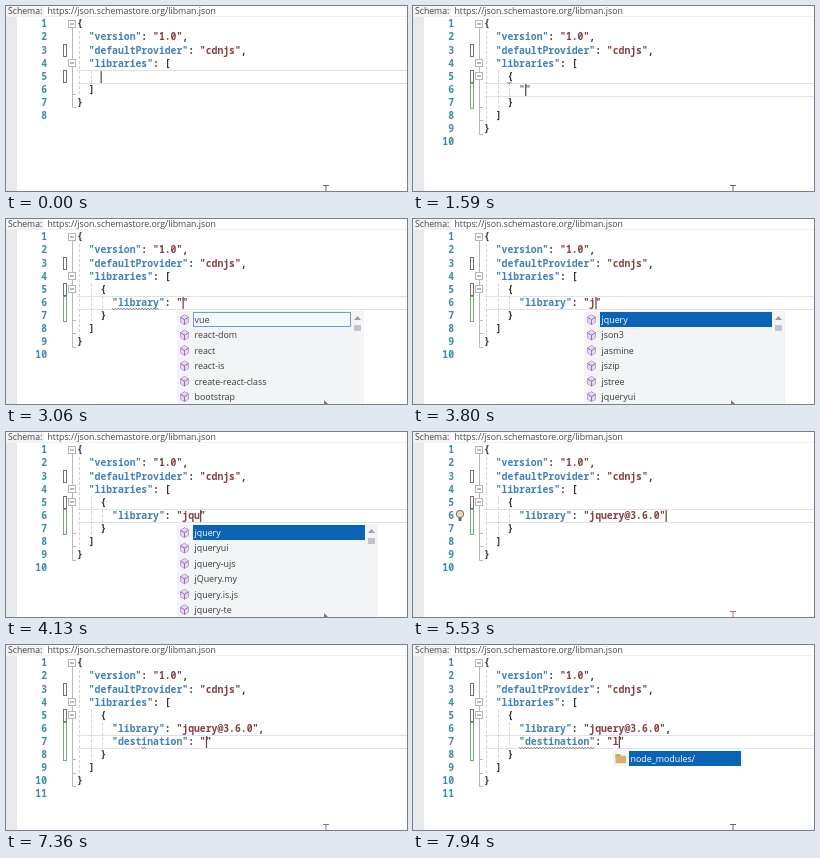
An HTML page with a canvas for the animation above (8 s loop, 401x185 px).

```html
<!DOCTYPE html>
<html lang="en">
<head>
<meta charset="utf-8">
<title>Editing libman.json</title>
<style>
html, body { margin: 0; width: 100%; height: 100%; overflow: hidden; background: #fff; }
canvas { display: block; width: 401px; height: 185px; }
</style>
</head>
<body>
<canvas id="stage"></canvas>
<script>
const W = 401, H = 185, LOOP = 8000;
const ADV = 5.85, LEFT = 71, PITCH = 13.07, ITEM = 15.4;
const MONO = '600 9.75px "Noto Sans Mono", monospace';
const UI = '"Open Sans", "Noto Sans", sans-serif';

const canvas = document.getElementById('stage');
const ratio = window.devicePixelRatio || 1;
canvas.width = W * ratio;
canvas.height = H * ratio;
const ctx = canvas.getContext('2d', { alpha: false });

const rowTop = row => 12 + PITCH * (row - 1);
const colX = col => LEFT + ADV * col;

const HEAD = ['{', '  "version": "1.0",', '  "defaultProvider": "cdnjs",', '  "libraries": ['];
const TAIL = ['  ]', '}', ''];
const LIBRARY = '"library": "jquery@3.6.0",';

const keyList = (y, ...items) => ({ x: 108, y, w: 83, items, icon: 'wrench' });
const packages = (w, filled, items) =>
  ({ x: 171, y: 93, w, items: items.split(' '), icon: 'cube', filled, scroll: true });
const folders = (filled, ...items) => ({ x: 200, y: 106, w: 130, items, icon: 'folder', filled });

const J_LIST = 'jquery json3 jasmine jszip jstree jqueryui';
const JQ_LIST = 'jquery jqueryui jquery-ujs jQuery.my jquery.is.js jquery-te';

// Each step changes part of the editor state; the rest carries over.
const STEPS = [
  [0, { body: [''], open: false, row: 5, col: 4, on: true, popup: null, waves: [], bulb: false, mouse: 'beam', red: false }],
  [260, { on: false }],
  [720, { body: ['{'], col: 5, on: true }],
  [790, { body: ['{}'] }],
  [1120, { body: [''], open: true, row: 6, col: 4 }],
  [1250, { col: 6 }],
  [1590, { body: ['""'], col: 7, waves: [[5, 4, 5]] }],
  [1640, { popup: keyList(92, 'destination', 'files', 'library', 'provider') }],
  [2110, { on: false }],
  [2310, { body: ['"l"'], col: 8, on: true }],
  [2380, { popup: keyList(92, 'library', 'files') }],
  [2450, { body: ['"li"'], col: 9, popup: keyList(92, 'library') }],
  [2520, { body: ['"lib"'], col: 10 }],
  [2590, { body: ['"library": '], col: 17, popup: null }],
  [2860, { body: ['"library": ""'], col: 18 }],
  [2930, { waves: [] }],
  [2990, { waves: [[6, 6, 14]] }],
  [3060, { popup: packages(187, false, 'vue react-dom react react-is create-react-class bootstrap'), mouse: 'arrow' }],
  [3400, { on: false }],
  [3620, { body: ['"library": "j"'], col: 19, on: true }],
  [3700, { popup: packages(201, true, J_LIST), waves: [] }],
  [3830, { body: ['"library": "jq"'], col: 20 }],
  [3920, { popup: packages(201, true, JQ_LIST) }],
  [4050, { body: ['"library": "jqu"'], col: 21 }],
  [4530, { body: ['"library": "jquery@3.6.0"'], col: 31, popup: null, mouse: 'beam', red: true }],
  [5010, { on: false, bulb: true }],
  [5530, { on: true }],
  [5670, { body: [LIBRARY], col: 32, bulb: false }],
  [5930, { body: [LIBRARY, ''], row: 7, col: 6 }],
  [6200, { body: [LIBRARY, '""'], col: 7 }],
  [6270, { popup: keyList(105, 'destination', 'files', 'provider') }],
  [6680, { body: [LIBRARY, '"d"'], col: 8 }],
  [6780, { popup: keyList(105, 'destination', 'provider') }],
  [6870, { body: [LIBRARY, '"de"'], col: 9 }],
  [7010, { body: [LIBRARY, '"des"'], col: 10 }],
  [7080, { popup: keyList(105, 'destination') }],
  [7150, { body: [LIBRARY, '"dest"'], col: 11 }],
  [7360, { body: [LIBRARY, '"destination": ""'], col: 22, popup: null, waves: [[7, 11, 12]] }],
  [7460, { popup: folders(false, 'bin/', 'node_modules/', 'obj/', 'Properties/', 'wwwroot/'), mouse: 'arrow' }],
  [7560, { waves: [[7, 6, 19]] }],
  [7850, { body: [LIBRARY, '"destination": "l"'], col: 23 }],
  [7940, { popup: folders(true, 'node_modules/'), mouse: 'beam', red: false }]
];

function stateAt(t) {
  const state = {};
  for (const [time, change] of STEPS) if (time <= t) Object.assign(state, change);
  return state;
}

function linesOf(s) {
  const pad = n => line => ' '.repeat(n) + line;
  const body = s.open ? ['    {', ...s.body.map(pad(6)), '    }'] : s.body.map(pad(4));
  return [...HEAD, ...body, ...TAIL];
}

function fill(color, x, y, w, h) {
  ctx.fillStyle = color;
  ctx.fillRect(x, y, w, h);
}

function box(color, x, y, w, h) {
  ctx.strokeStyle = color;
  ctx.strokeRect(x + 0.5, y + 0.5, w - 1, h - 1);
}

function path(color, points, close) {
  ctx.strokeStyle = color;
  ctx.beginPath();
  points.forEach(([x, y]) => ctx.lineTo(x, y));
  if (close) ctx.closePath();
  ctx.stroke();
}

function text(str, x, y, color, font) {
  ctx.font = font;
  ctx.fillStyle = color;
  ctx.fillText(str, x, y);
}

// The first string on a line is a key, the later ones are values.
function codeLine(line, row) {
  let strings = 0;
  const y = rowTop(row) + 9.4;
  for (const m of line.matchAll(/"[^"]*"|[^"\s]+/g)) {
    const color = m[0][0] !== '"' ? '#333' : strings++ ? '#84403f' : '#4180b8';
    text(m[0], colX(m.index), y, color, MONO);
  }
}

function guide(col, from, to) {
  ctx.setLineDash([3, 2]);
  const x = Math.round(colX(col)) + 2.5;
  path('#d2d2d6', [[x, rowTop(from)], [x, rowTop(to + 1)]]);
  ctx.setLineDash([]);
}

function foldBox(row) {
  const y = Math.round(rowTop(row)) + 2;
  fill('#fff', 62, y, 8, 8);
  box('#b4b4b4', 62, y, 8, 8);
  fill('#777', 64, y + 3.5, 4, 1);
}

function gutter(s, count) {
  fill('#e8e9ea', 0, 11, 11, H);
  ctx.textAlign = 'right';
  for (let n = 1; n <= count; n++) text(n, 41, rowTop(n) + 9.4, '#3a8cae', MONO);
  ctx.textAlign = 'left';

  box('#707070', 57, 38, 4, 13);
  box('#707070', 57, 64, 4, 13);
  if (s.open) box('#72ad78', 57, 77, 4, Math.round(PITCH * (s.body.length + 1)));

  const last = count - 1;
  const end = Math.round(rowTop(last)) + 11.5;
  path('#b8b8b8', [[66.5, 20], [66.5, end], [70, end]]);
  const closers = s.open ? [last - 1, last - 2] : [last - 1];
  for (const row of closers) {
    const y = Math.round(rowTop(row)) + 11.5;
    path('#b8b8b8', [[66.5, y], [70, y]]);
  }
  [1, 4].concat(s.open ? 5 : []).forEach(foldBox);
}

function header() {
  fill('#f3f3f5', 0, 0, 38, 11);
  fill('#f0f0f3', 38, 10, W - 38, 1);
  text('Schema:', 2, 8, '#444', '8.7px ' + UI);
  text('https://json.schemastore.org/libman.json', 41.5, 8, '#444', '8.75px ' + UI);
}

function wave([row, from, to]) {
  const points = [];
  const y = rowTop(row) + 12.4;
  for (let x = colX(from), i = 0; x <= colX(to); x += 1.5, i++) points.push([x, y + (i % 2 ? 1 : -0.6)]);
  path('#7b807b', points);
}

const icons = {
  cube(x, y) {
    const corner = i => [x + 4.6 * Math.sin(i * Math.PI / 3), y - 4.8 * Math.cos(i * Math.PI / 3)];
    ctx.fillStyle = '#e4d8ec';
    path('#9470b2', [0, 1, 2, 3, 4, 5].map(corner), true);
    ctx.fill();
    for (const i of [1, 3, 5]) path('#9470b2', [[x, y], corner(i)]);
  },
  wrench(x, y) {
    ctx.lineWidth = 1.6;
    path('#666', [[x - 3.5, y + 3.5], [x + 1, y - 1]]);
    ctx.beginPath();
    ctx.arc(x + 1.8, y - 1.8, 2.2, 0, Math.PI * 1.5);
    ctx.stroke();
    ctx.lineWidth = 1;
  },
  folder(x, y) {
    fill('#c49a52', x - 5, y - 4.5, 5, 3);
    fill('#d6b06c', x - 5, y - 3, 10.5, 7.5);
  }
};

function popup(p) {
  const h = p.items.length * ITEM;
  const bottom = p.scroll ? H + 2 : p.y + h;
  fill('#f3f4f5', p.x, p.y - 1, p.w, bottom - p.y + 1);
  const selW = p.w - 17 - (p.scroll ? 12 : 1);
  if (p.filled) fill('#0a63b5', p.x + 16, p.y, selW, 15);
  else {
    fill('#f6f9fc', p.x + 16, p.y, selW, 15);
    box('#6a9fd8', p.x + 16, p.y, selW, 15);
  }
  p.items.forEach((item, i) => {
    const y = p.y + ITEM * (i + 0.5);
    icons[p.icon](p.x + 7.5, y);
    text(item, p.x + 17.5, y + 3.2, p.filled && !i ? '#fff' : '#3a3a3a', '8.9px ' + UI);
  });
  if (p.scroll) {
    const x = p.x + p.w - 6.5;
    ctx.fillStyle = '#9a9ca8';
    ctx.beginPath();
    ctx.moveTo(x - 3.5, 101);
    ctx.lineTo(x, 97);
    ctx.lineTo(x + 3.5, 101);
    ctx.fill();
    fill('#c2c3ca', x - 3.5, 106, 7, 6);
  }
}

function bulb() {
  ctx.fillStyle = '#e3d9b4';
  ctx.strokeStyle = '#6e6e6e';
  ctx.beginPath();
  ctx.arc(47, 82, 3.7, 0, Math.PI * 2);
  ctx.fill();
  ctx.stroke();
  fill('#666', 45.5, 86, 3, 3);
}

function mouse(kind, red) {
  if (kind === 'beam') {
    const color = red ? '#a86a74' : '#666';
    path(color, [[317, 179.5], [323, 179.5]]);
    path(color, [[320, 179.5], [320, H]]);
    return;
  }
  ctx.fillStyle = '#777';
  ctx.beginPath();
  [[318, 181], [318, 187], [322.5, 185.5]].forEach(([x, y]) => ctx.lineTo(x, y));
  ctx.fill();
}

function draw(t) {
  const s = stateAt(t);
  const lines = linesOf(s);
  const count = lines.length;
  ctx.setTransform(ratio, 0, 0, ratio, 0, 0);
  ctx.lineWidth = 1;
  fill('#fff', 0, 0, W, H);
  header();
  gutter(s, count);

  const top = Math.round(rowTop(s.row));
  fill('#e1e1e5', LEFT, top, W - LEFT, 1);
  fill('#e1e1e5', LEFT, top + 13, W - LEFT, 1);

  guide(0, 2, count - 2);
  guide(2, 5, count - 3);
  if (s.open) guide(4, 6, count - 4);

  lines.forEach((line, i) => codeLine(line, i + 1));
  s.waves.forEach(wave);
  if (s.on) fill('#5a4545', colX(s.col) + 0.2, top + 1, 1.2, 12);
  if (s.bulb) bulb();
  if (s.popup) popup(s.popup);
  mouse(s.mouse, s.red);
}

const start = performance.now();
function tick() {
  draw((performance.now() - start) % LOOP);
  requestAnimationFrame(tick);
}
tick();
</script>
</body>
</html>
```
